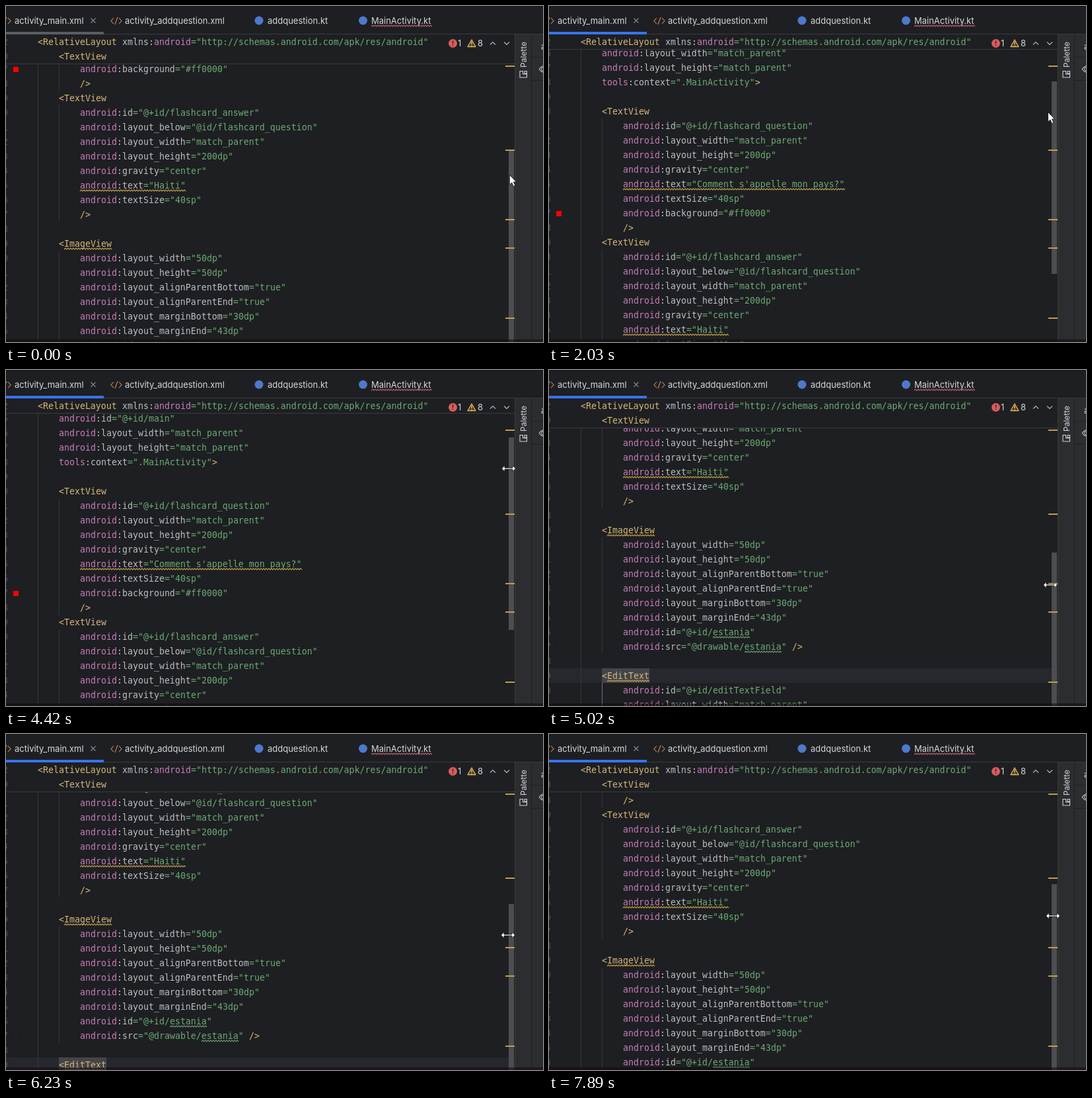
Recreate the animation shown at these times as an HTML page. Size 813 px wide and 508 px high, loop 8000 ms.

```html
<!DOCTYPE html>
<html lang="en">
<head>
<meta charset="utf-8">
<title>Layout editor</title>
<style>
  html, body { margin: 0; width: 100%; height: 100%; overflow: hidden; background: #1e1f22; }
  svg { display: block; width: 100vw; height: 100vh; }
  .code { font: 13.288px "DejaVu Sans Mono", monospace; white-space: pre; }
  .ui { font: 13px Inter, sans-serif; fill: #d5d7dc; }
  .tag { fill: #d5b778; }
  .ns { fill: #c77dbb; }
  .attr { fill: #bcbec4; }
  .val { fill: #6aab73; }
  .unused tspan { fill: #6f737a; }
  .num { fill: #4b5059; text-anchor: end; }
  .line { fill: none; stroke-width: 1.1; }
</style>
</head>
<body>
<svg viewBox="0 0 813 508">
  <rect width="813" height="508" fill="#1e1f22"/>
  <g id="doc"></g>
  <g id="sticky"></g>
  <g id="frame"></g>
  <g id="bar"></g>
  <rect y="504" width="813" height="4" fill="#14070c" opacity=".55"/>
  <g id="cursor"></g>
</svg>
<script>
const LOOP = 8000, STEP = 125, ROW = 22, CH = 8, LEFT = 48, TOP = 43, EDITOR = 770;

const source = `<?xml version="1.0" encoding="utf-8"?>
<RelativeLayout xmlns:android="http://schemas.android.com/apk/res/android"
    xmlns:app="http://schemas.android.com/apk/res-auto"
    xmlns:tools="http://schemas.android.com/tools"
    android:id="@+id/main"
    android:layout_width="match_parent"
    android:layout_height="match_parent"
    tools:context=".MainActivity">

    <TextView
        android:id="@+id/flashcard_question"
        android:layout_width="match_parent"
        android:layout_height="200dp"
        android:gravity="center"
        android:text="Comment s'appelle mon pays?"
        android:textSize="40sp"
        android:background="#ff0000"
        />
    <TextView
        android:id="@+id/flashcard_answer"
        android:layout_below="@id/flashcard_question"
        android:layout_width="match_parent"
        android:layout_height="200dp"
        android:gravity="center"
        android:text="Haiti"
        android:textSize="40sp"
        />

    <ImageView
        android:layout_width="50dp"
        android:layout_height="50dp"
        android:layout_alignParentBottom="true"
        android:layout_alignParentEnd="true"
        android:layout_marginBottom="30dp"
        android:layout_marginEnd="43dp"
        android:id="@+id/estania"
        android:src="@drawable/estania" />

    <EditText
        android:id="@+id/editTextField"
        android:layout_width="match_parent"
        android:layout_height="wrap_content"
        android:hint="Question"`.split("\n");

const BACK = "#1e1f22", GOLD = "#c29e4a", GREEN = "#6a9a6f", EDGE = "#393b40", ICON = "#ced0d6";
const $ = id => document.getElementById(id);
const rect = (x, y, w, h, fill) =>
  `<rect x="${x}" y="${y}" width="${w}" height="${h}" fill="${fill}"/>`;
const stroke = (d, color) => `<path class="line" d="${d}" stroke="${color}"/>`;
const wave = (x, y, w, color) =>
  stroke(`M${x} ${y + 1}` + "l2 -2l2 2".repeat(Math.round(w / 4)), color);
const label = (x, y, text) => `<text class="ui" x="${x}" y="${y}">${text}</text>`;
const escape = s => s.replace(/&/g, "&amp;").replace(/</g, "&lt;");

const TOKEN = /(?<tag><\??\w+|\??\/?>)|(?<val>="[^"]*")|(?<ns>(?<=xmlns:)\w+|(?!xmlns)\b\w+(?=:))|(?<attr>xmlns:|:?\w+)/g;

// One numbered code line, centred vertically on y
function codeLine(n, y) {
  const text = source[n - 1];
  let spans = "";
  for (const m of text.matchAll(TOKEN)) {
    const kind = Object.keys(m.groups).find(k => m.groups[k]);
    spans += `<tspan class="${kind}" x="${LEFT + m.index * CH}">${escape(m[0])}</tspan>`;
  }
  return `<text class="code num" x="3" y="${y + 5}">${n % 10}</text>` +
    `<text class="code${text.includes(":app=") ? " unused" : ""}" y="${y + 5}">${spans}</text>`;
}

function underline(n, part, color) {
  const start = source[n - 1].indexOf(part);
  return wave(LEFT + start * CH, n * ROW + 8, part.length * CH, color);
}

const guide = (x, from, to, color = "#34363a") =>
  rect(x, from * ROW - 11, 1, (to - from + 1) * ROW, color);

const caretY = 39 * ROW - 11;
$("doc").innerHTML =
  rect(0, caretY, EDITOR, ROW, "#26282e") + rect(80, caretY, 9 * CH, ROW, "#43454a") +
  guide(LEFT, 3, 46) + guide(80, 11, 18) + guide(80, 20, 27) +
  guide(80, 30, 37) + guide(80, 40, 46, "#6f737a") +
  source.map((_, i) => codeLine(i + 1, (i + 1) * ROW)).join("") +
  [15, 25].map(n => underline(n, source[n - 1].trim(), GOLD)).join("") +
  underline(29, "ImageView", GOLD) + underline(39, "EditText", GOLD) +
  [36, 37].map(n => underline(n, "estania", GREEN)).join("") +
  rect(11, 17 * ROW - 3, 8, 8, "#ff0000") +
  `<circle cx="16" cy="${37 * ROW}" r="6.5" fill="none" stroke="#17181a"/>`;

$("sticky").innerHTML =
  `<g id="inner">${rect(0, -11, EDITOR, ROW, BACK)}${rect(0, 11, EDITOR, 1, EDGE)}` +
  `<g id="first">${codeLine(10, 0)}</g><g id="second">${codeLine(19, 0)}</g></g>` +
  `<g id="outer">${rect(0, TOP, EDITOR, ROW, BACK)}${codeLine(2, 54)}` +
  `<g id="edge">${rect(0, TOP + ROW, EDITOR, 1, EDGE)}</g></g>`;

const xmlIcon = x =>
  stroke(`M${x - 4} 18l-4 4.5l4 4.5M${x + 4} 18l4 4.5l-4 4.5M${x + 2} 17l-4 11`, "#c58a5e");
const dot = x => `<circle cx="${x}" cy="22" r="6.5" fill="#4d79cc"/>`;
const alertMark = (x, y, color) => rect(x - 0.7, y, 1.4, 4.5, color) + rect(x - 0.7, y + 6, 1.4, 1.5, color);

const tabs =
  rect(0, 0, 813, TOP, BACK) + rect(0, 0, 813, 1, "#141518") + rect(0, TOP - 1, 813, 1, EDGE) +
  `<rect id="tabline" y="39" width="148" height="4"/>` +
  xmlIcon(-1) + label(13, 27, "activity_main.xml") + stroke("M128.5 18.5l7 7m0 -7l-7 7", "#868a91") +
  xmlIcon(167) + label(180, 27, "activity_addquestion.xml") +
  dot(383) + label(396, 27, "addquestion.kt") +
  dot(540.5) + label(553, 27, "MainActivity.kt") + wave(553, 30, 92, "#b8606a");

const inspections =
  `<circle cx="676.5" cy="56.5" r="6.5" fill="#db5c5c"/>` + alertMark(676.5, 52.5, BACK) +
  label(684, 61, "1") +
  `<path d="M705 51l6 10.5h-12z" fill="#4a3d20" stroke="#e0b55c" stroke-width="1.3" stroke-linejoin="round"/>` +
  alertMark(705, 53.5, "#e8c377") + label(714, 61, "8") +
  stroke("M733 58.5l4 -4l4 4M754 54.5l4 4l4 -4", "#b4b8bf");

const sidebar =
  rect(EDITOR, TOP, 43, 465, "#2b2d30") + rect(EDITOR, TOP, 1, 465, EDGE) + rect(795, TOP, 1, 465, BACK) +
  rect(796, 77, 17, 1, BACK) + rect(796, 112, 17, 1, BACK) +
  `<text class="ui" transform="translate(787.5 93) rotate(-90)" style="font-size:12px">Palette</text>` +
  stroke("M782.5 98.5h-4.5v9.500h10.500v-5h-6zM785 98.5h3.500v3.500h-3.500z", ICON) +
  label(810, 66, "a") + stroke("M807 95.5q4 -5 8 -5M807 95.5q4 5 8 5", ICON) +
  `<circle cx="813" cy="95.5" r="2.5" fill="none" stroke="${ICON}"/>`;

$("frame").innerHTML = tabs + inspections + sidebar;

$("bar").innerHTML = `<rect id="thumb" x="761" width="8" height="291" fill="#4d4e51"/>` +
  [90, 217, 322, 365, 471].map(y => rect(756, y, 14, 2, GOLD)).join("");

$("cursor").innerHTML =
  `<path id="arrow" d="M.5 .5V15L3.8 12L6.3 17.5L8.8 16.5L6.5 11H10.5Z" fill="#fff" stroke="#111" stroke-width=".8"/>` +
  `<path id="resize" d="M-10.5 0L-6 -4.5V-1H6V-4.5L10.5 0L6 4.5V1H-6V4.5Z" fill="#fff" stroke="#111" stroke-width=".8"/>`;

// Turning points of the scrollbar drag: time, pointer x, pointer y, scroll
const keys = [
  [0, 762, 255, 279],
  [120, 768, 264, 279],
  [280, 768, 264, 279],
  [760, 755, 267, 279],
  [1170, 755, 267, 279],
  [2030, 755, 160, 61],
  [2630, 758, 130, -7],
  [3470, 759, 133, -7],
  [4000, 761, 76, -107],
  [4180, 762, 79, -107],
  [5020, 759, 325, 396],
  [5440, 759, 340, 427],
  [5750, 758, 340, 427],
  [6230, 760, 304, 358],
  [7140, 758, 245, 240],
  [7890, 763, 275, 296],
  [LOOP, 763, 275, 296]
];
const MIN_SCROLL = -32;

// Moves in even screen refreshes between two turning points
function pose(t) {
  const i = keys.findLastIndex(k => k[0] <= t);
  const a = keys[i], b = keys[i + 1];
  const span = b[0] - a[0];
  const steps = Math.max(1, Math.round(span / STEP));
  const p = Math.floor((t - a[0]) / span * steps + 0.001) / steps;
  const [, x, y, scroll] = a.map((v, j) => Math.round(v + (b[j] - v) * p));
  return { x, y, scroll: Math.max(MIN_SCROLL, scroll) };
}

const show = (id, on) => $(id).setAttribute("display", on ? "inline" : "none");
const move = (id, x, y) => $(id).setAttribute("transform", `translate(${x} ${y})`);

function draw(t) {
  const { x, y, scroll } = pose(t);
  const rowY = n => n * ROW - scroll;

  move("doc", 0, -scroll);
  $("thumb").setAttribute("y", Math.round(84.4 + scroll * 0.483));
  $("tabline").setAttribute("fill", t < 1290 ? "#5a5d63" : "#3574f0");

  // Enclosing tags stick below the tabs; a closing tag pushes its header away
  const inSecond = rowY(19) < 76;
  const nested = rowY(10) < 76;
  show("outer", rowY(2) < 54);
  show("inner", nested);
  show("first", !inSecond);
  show("second", inSecond);
  show("edge", !nested);
  move("inner", 0, inSecond ? 76 : Math.min(76, rowY(18)));

  const resizing = t >= 4300 || (t >= 120 && t < 520);
  show("resize", resizing);
  show("arrow", !resizing);
  move("cursor", x, y);
}

const start = performance.now();
function loop() {
  draw((performance.now() - start) % LOOP);
  requestAnimationFrame(loop);
}
loop();
</script>
</body>
</html>
```
